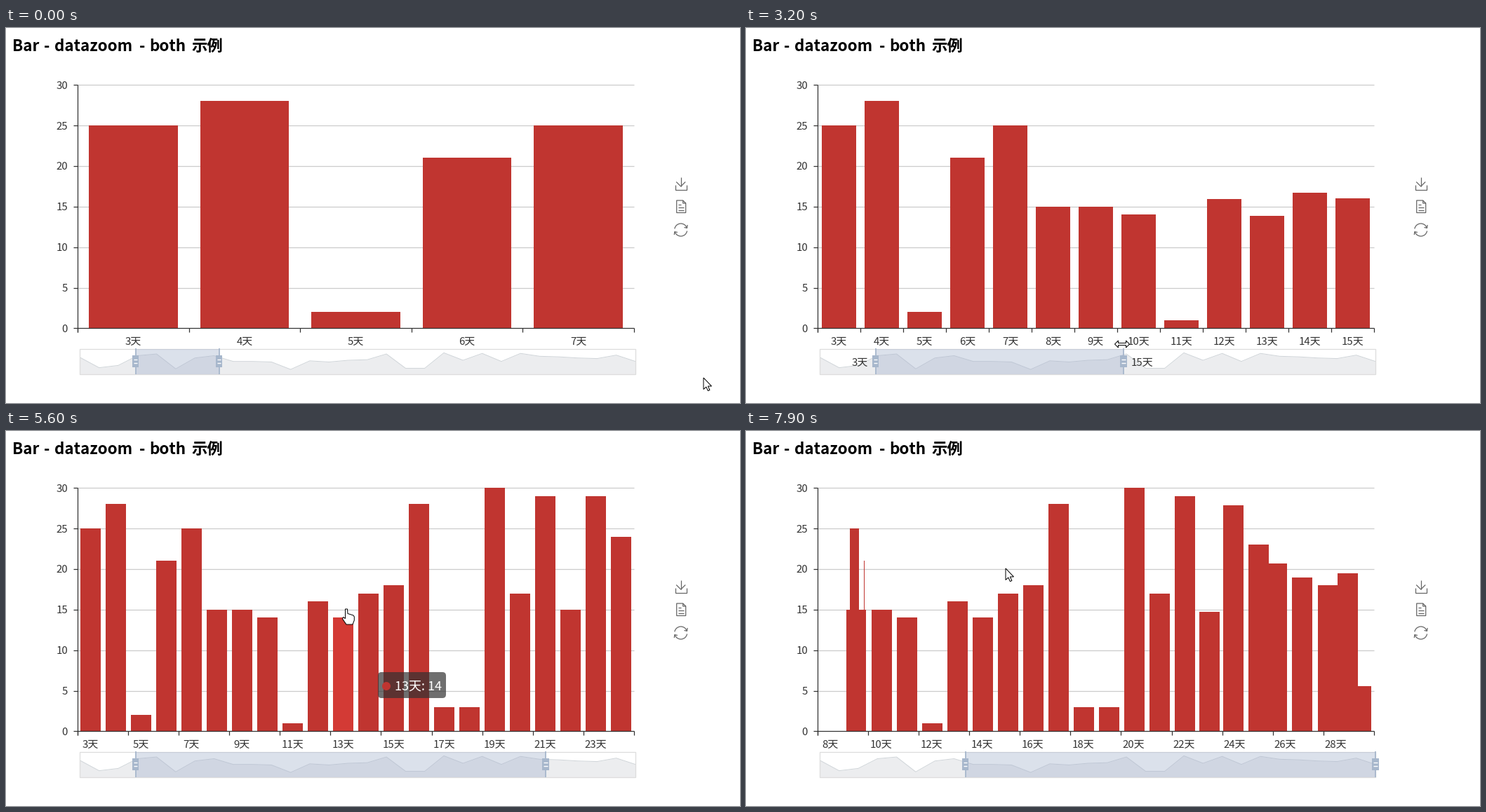
Recreate the animation shown at these times as a matplotlib script. Size 1046 px wide and 535 px high, loop 8000 ms.

```python
import numpy as np
import matplotlib
import matplotlib.pyplot as plt
from matplotlib.animation import FuncAnimation
from matplotlib.patches import Arc, Circle, FancyBboxPatch, Polygon, Rectangle

W, H, DPI = 1046, 535, 100
STEP, FRAMES = 100, 80
PX = 72 / DPI
matplotlib.rcParams["font.family"] = "Noto Sans CJK JP"

LEFT, RIGHT, BASE, UNIT = 102.2, 894.7, 428.4, 11.57
TRACK_L, TRACK_R, TRACK_T, TRACK_B = 105.4, 897, 457.5, 493.5
RED, HOT, INK, GRIP = "#c03530", "#d33a35", "#333333", "#a7b7cc"

# One value per day
VALUES = [22, 4, 8, 25, 28, 2, 21, 25, 15, 15, 14, 1, 16, 14, 17,
          18, 28, 3, 3, 30, 17, 29, 15, 29, 24, 23, 21, 20, 26, 15]
TOP_DAY = len(VALUES) - 1
DAY_PX = (TRACK_R - TRACK_L) / TOP_DAY

# Pointer path: (ms, x, y)
PATH = [(0, 994, 499), (700, 400, 421), (900, 362, 435), (1400, 301.5, 469),
        (1740, 301.5, 469), (2000, 366.5, 438), (2820, 524, 449), (3100, 525.5, 450),
        (3200, 536, 451), (3600, 609, 456), (4000, 667.5, 461), (4700, 767, 468),
        (5400, 510, 324), (5600, 485, 253), (6200, 584, 170), (7000, 694, 112),
        (7170, 690, 116), (7506, 486, 166), (7900, 370, 196)]
DRAG_START, DRAG_END, PAN_START = 1740, 4700, 5600

# The chart follows the pointer at a throttled rate, then eases
FIRST_TICK, TICK = 1882, 133.9
LAG, MOVE, GROW = 60, 300, 1000

ARROW = [(0, 0), (0, 16.5), (3.8, 13), (6.4, 18.6), (8.9, 17.5), (6.4, 12), (11.5, 12)]
HALF = [(5.5, -1.5), (5.5, -5), (10.5, 0), (5.5, 5), (5.5, 1.5)]
RESIZE = HALF + [(-x, -y) for x, y in HALF]
HAND = [(-1.5, 1), (1.5, 1), (2, 7.5), (10, 10), (11.3, 12), (11.3, 17),
        (9, 23), (0, 23), (-5.5, 15), (-4.5, 12.5), (-1.5, 14.5)]

fig = plt.figure(figsize=(W / DPI, H / DPI), dpi=DPI, facecolor="white")
ax = fig.add_axes([0, 0, 1, 1])
ax.set_xlim(0, W)
ax.set_ylim(H, 0)
ax.axis("off")


def line(points, color, width=1.25, z=1):
    xs, ys = zip(*points)
    return ax.plot(xs, ys, color=color, lw=width * PX, zorder=z,
                   solid_capstyle="butt", solid_joinstyle="miter")[0]


def box(x0, y0, x1, y1, color, z=1, **kw):
    return ax.add_patch(Rectangle((x0, y0), x1 - x0, y1 - y0,
                                  fc=color, lw=0, zorder=z, **kw))


def text(x, y, s, size=15, color=INK, ha="left", z=3, **kw):
    return ax.text(x, y, s, fontsize=size * PX, color=color, ha=ha,
                   va="baseline", zorder=z, **kw)


def draw_axes():
    for x, word in ((9, "Bar"), (53.5, "-"), (69.5, "datazoom"),
                    (189.5, "-"), (204, "both"), (264.5, "示例")):
        text(x, 33, word, 22.4, "black", weight="bold")
    for v in range(0, 31, 5):
        y = BASE - v * UNIT
        if v:
            line([(LEFT, y), (RIGHT, y)], "#cccccc")
        line([(96, y), (LEFT, y)], INK, z=3)
        text(88, y + 5.5, str(v), ha="right")
    line([(LEFT, 81), (LEFT, 434)], INK, z=3)
    line([(LEFT, BASE), (RIGHT, BASE)], INK, z=3)
    line([(RIGHT, BASE), (RIGHT, 434)], INK, z=3)


def draw_track():
    xs = np.linspace(TRACK_L, TRACK_R, len(VALUES))
    ys = 487.9 - .816 * np.array(VALUES)
    ax.fill_between(xs, ys, TRACK_B, color="#ecedef", lw=0, zorder=1)
    line(list(zip(xs, ys)), "#d0d5d9", 1, z=2)
    ax.add_patch(Rectangle((TRACK_L, TRACK_T), TRACK_R - TRACK_L, TRACK_B - TRACK_T,
                           fc="none", ec="#dddddd", lw=1.25 * PX, zorder=2))


def draw_icons():
    grey, cx = "#666666", 961.7
    line([(cx, 213), (cx, 226)], grey)
    line([(cx - 6.5, 219.5), (cx, 226), (cx + 6.5, 219.5)], grey)
    line([(cx - 8, 224), (cx - 8, 230.5), (cx + 8, 230.5), (cx + 8, 224)], grey)
    line([(cx + 3, 246), (cx - 6, 246), (cx - 6, 263.5), (cx + 7, 263.5),
          (cx + 7, 250), (cx + 3, 246), (cx + 3, 250), (cx + 7, 250)], grey)
    for k, end in enumerate((0, 4, 4)):
        line([(cx - 3.5, 251.5 + 4 * k), (cx + end, 251.5 + 4 * k)], grey)
    for side in (1, -1):
        turn = 90 + 90 * side
        ax.add_patch(Arc((cx, 288), 18, 18, theta1=turn + 10, theta2=turn + 165,
                         ec=grey, lw=1.25 * PX))
        line([(cx + side * dx, 288 - side * dy)
              for dx, dy in ((4.8, 3.5), (8.8, 2.7), (9.4, 7))], grey)


def pointer(t):
    ms, xs, ys = zip(*PATH)
    return np.interp(t, ms, xs), np.interp(t, ms, ys)


def drag_handle(t):
    return pointer(np.clip(t, DRAG_START, DRAG_END))[0] + 2


def zoom_updates():
    """Window after each throttled update: (ms, first, last, handle x, handle x)."""
    low = .1 * TOP_DAY
    lo_x, end_x = TRACK_L + low * DAY_PX, drag_handle(DRAG_END)
    span = (end_x - lo_x) / DAY_PX
    updates = [(-9999, 3, 7, lo_x, drag_handle(0))]
    grab = pointer(PAN_START)[0]
    for t in np.arange(FIRST_TICK, FRAMES * STEP, TICK):
        if t <= PAN_START:
            hi_x = drag_handle(t)
            first, last = 3, round((hi_x - TRACK_L) / DAY_PX)
        else:
            x = pointer(t)[0]
            low = np.clip(low - (x - grab) * span / (RIGHT - LEFT), 0, TOP_DAY - span)
            grab = x
            lo_x = TRACK_L + low * DAY_PX
            hi_x = lo_x + span * DAY_PX
            first = round(low)
            last = first + int(span)
        if (first, last) != updates[-1][1:3] or t > PAN_START:
            updates.append((t, first, last, lo_x, hi_x))
    return updates


UPDATES = zoom_updates()


def current(move, t):
    start, goal, since = move
    p = np.clip((t - since - LAG) / MOVE, 0, 1)
    return start + (goal - start) * (1 - (1 - p) ** 3)


def layout(first, last):
    """Goals by day: bars as (x, width), marks as (tick x, label x)."""
    slot = (RIGHT - LEFT) / (last - first + 1)
    gap = 2 if last - first >= 19 else 1
    lefts = {i: LEFT + (i - first) * slot for i in range(first, last + 1)}
    bars = {i: np.array([x + slot * .1, slot * .8]) for i, x in lefts.items()}
    marks = {i: np.array([x, x + slot / 2])
             for i, x in lefts.items() if (i - first) % gap == 0}
    return bars, marks


def retarget(moves, goals, when):
    return {i: (current(moves[i], when) if i in moves else goal, goal, when)
            for i, goal in goals.items()}


def chart_at(t):
    """Replay the zoom updates up to t."""
    bars, marks, born, gone, window = {}, {}, {}, [], None
    for when, first, last, *_ in UPDATES:
        if when > t:
            break
        if window == (first, last):
            continue
        window = first, last
        bar_goals, mark_goals = layout(first, last)
        for i in set(bars) - set(bar_goals):
            at = current(bars[i], when)
            gone.append((i, (at, at * [1, 0], when)))
        born = {i: born.get(i, when) for i in bar_goals}
        bars = retarget(bars, bar_goals, when)
        marks = retarget(marks, mark_goals, when)
    shapes = [(i, *current(m, t), VALUES[i]) for i, m in gone]
    for i, m in bars.items():
        grown = max(0, (t - born[i] - LAG) / GROW)
        h = VALUES[i] * (1 - 2 ** (-10 * grown) if grown < 1 else 1)
        shapes.append((i, *current(m, t), h))
    return window, shapes, {i: current(m, t) for i, m in marks.items()}


def draw_slider(t, window):
    lo, hi = [u for u in UPDATES if u[0] <= t][-1][3:]
    if t <= PAN_START:
        hi = drag_handle(t)
    out = [box(lo, TRACK_T, hi, TRACK_B, "#a7b4cf", 3, alpha=.4)]
    for x in (lo, hi):
        out += [line([(x, TRACK_T - .5), (x, TRACK_B + .5)], GRIP, 1.8, 4),
                box(x - 4.7, 467, x + 4.7, 483.5, GRIP, 4)]
        out += [line([(x - 2.7, y), (x + 2.7, y)], "white", 1.4, 5)
                for y in (472.5, 477.5)]
    if 1300 <= t <= DRAG_END:
        out += [text(lo - 10.5, 481.5, f"{window[0]}天", ha="right", z=6),
                text(hi + 11, 481.5, f"{window[1]}天", z=6)]
    return out


def draw_tip(t, day):
    x, y = np.add(pointer(t - 200), 20)
    label = f"{day}天: {VALUES[day]}"
    width = 97 - 10 * (7 - len(label))
    return [ax.add_patch(FancyBboxPatch((x + 5, y + 5), width - 10, 27,
                                        boxstyle="round,pad=5,rounding_size=5",
                                        fc=(.196, .196, .196, .7), lw=0, zorder=7)),
            ax.add_patch(Circle((x + 12, y + 20), 6, fc=RED, lw=0, zorder=8)),
            text(x + 24, y + 25.5, label, 18, "white", z=8)]


def draw_pointer(t, over_bar):
    shape = RESIZE if 1200 <= t <= DRAG_END else HAND if over_bar else ARROW
    return ax.add_patch(Polygon(np.add(shape, pointer(t)), fc="white", ec="black",
                                lw=PX, zorder=9))


live = []


def draw(frame):
    while live:
        live.pop().remove()
    t = frame * STEP
    window, shapes, marks = chart_at(t)
    cx, cy = pointer(t)
    hover = None
    for i, x, w, h in shapes:
        x0, x1, top = max(x, LEFT), min(x + w, RIGHT), BASE - h * UNIT
        if x1 <= x0 or h <= 0:
            continue
        hit = DRAG_END < t <= PAN_START and x0 <= cx <= x1 and top < cy + 14 < BASE
        if hit:
            hover = i
        live.append(box(x0, top, x1, BASE, HOT if hit else RED, 2))
    for i, (tick, label) in marks.items():
        live.append(line([(tick, BASE), (tick, 434)], INK, z=3))
        live.append(text(label, 452, f"{i}天", ha="center"))
    live.extend(draw_slider(t, window))
    if hover is not None:
        live.extend(draw_tip(t, hover))
    live.append(draw_pointer(t, hover is not None))
    return live


draw_axes()
draw_track()
draw_icons()
anim = FuncAnimation(fig, draw, frames=FRAMES, interval=STEP, init_func=lambda: live,
                     repeat=True, repeat_delay=0, blit=False)
plt.show()
```
